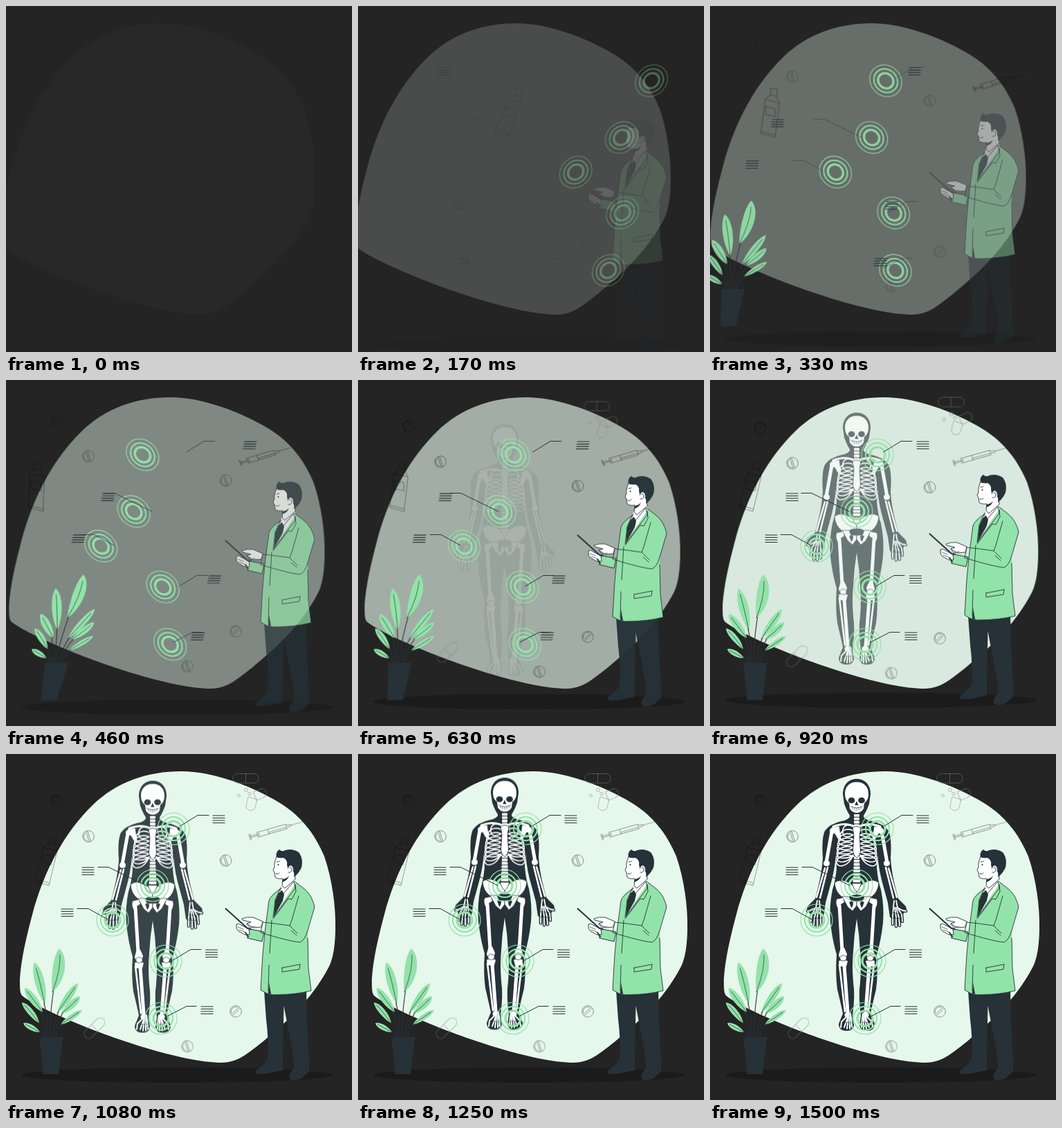
Animation of 500x500 px, one loop 1540 ms. Source, as an HTML page:

```html
<!DOCTYPE html>
<html lang="en">
<head>
<meta charset="utf-8">
<title>Anatomy lesson</title>
<style>
  html, body { margin: 0; width: 100%; height: 100%; overflow: hidden; background: #242424; }
  svg { display: block; width: 100vw; height: 100vh; }
  .line { fill: none; stroke: #263238; stroke-linecap: round; stroke-linejoin: round; }
  .ghost { fill: none; stroke: #000; stroke-opacity: .4; stroke-width: .9; }
  .caps { fill: none; stroke: #7d8480; stroke-opacity: .5; }
  .dark { fill: #263238; }
  .green { fill: #92e3a9; }
  .bone { fill: #fff; }
  .edged { fill: #fff; stroke: #263238; stroke-width: .8; stroke-linejoin: round; }
  .bones { fill: none; stroke: #fff; stroke-linecap: round; stroke-linejoin: round; }
</style>
</head>
<body>
<svg viewBox="0 0 500 500">
  <path id="blob" fill="#e6f7ec" d="M20 325C22 295 30 262 38 232C56 165 86 112 125 74C160 40 205 25 253 25C300 25 352 46 386 65C426 87 446 115 460 148C471 180 477 220 476 255C475 290 470 303 462 316C440 354 412 382 372 415C350 432 335 446 312 446C255 446 150 410 90 384C60 371 32 357 23 349C20 345 20 338 20 325Z"/>
  <ellipse id="shadow" cx="247" cy="464" rx="225" ry="11" fill="#1b1b1b"/>
  <g id="pills" class="ghost"></g>
  <g id="capsules" class="caps">
    <rect x="328" y="28.500" width="37" height="13.500" rx="6.700"/>
    <path d="M346.500 28.500V42"/>
    <g transform="translate(358 62) rotate(-24)">
      <path d="M2-6.500H13A6.500 6.500 0 0 1 13 6.500H2Z"/>
    </g>
    <path d="M350 62L363 66L360 77A6.700 6.700 0 0 1 347 74Z"/>
    <circle cx="336.500" cy="60" r="2"/><circle cx="347" cy="52" r="2.500"/><circle cx="352" cy="57.500" r="2.200"/>
    <g transform="translate(128 396) rotate(-45)">
      <rect x="-18.500" y="-6.700" width="37" height="13.400" rx="6.700"/><path d="M0-6.700V6.700"/>
    </g>
  </g>
  <g id="tube" class="ghost">
    <path d="M64.500 118.500L73 120.500L71 130.500L62 128.500ZM62 128.500L54 135L74 140L71 130.500M54 135L42 184L62 190L74 140M42.500 181L63 186.500M54 145L67 148.500L65.500 160L52 157Z"/>
  </g>
  <g id="syringe" class="ghost">
    <g transform="translate(352 120) rotate(-16)">
      <path d="M0-4.500V4.500M1.500-4.500V4.500M1.500-1H12M1.500 1H12M12-5V5M14-3.500H55V3.500H14ZM55-2L62-1V1L55 2M62 0H80"/>
      <path d="M28-3.500V3.500M28 1H54"/>
    </g>
  </g>
  <g id="body">
    <path class="dark" d="M212 36C225 36 232 46 232 58L230 72Q225 86 219 93H205Q199 86 194 72L192 58C192 46 199 36 212 36Z"/>
    <g id="half"></g>
    <use href="#half" transform="translate(424) scale(-1 1)"/>
    <path class="bone" d="M212 40.500C223 40.500 229 48 229 57C229 64 227 68 223 71L222 79Q218 85 212 85Q206 85 202 79L201 71C197 68 195 64 195 57C195 48 201 40.500 212 40.500Z"/>
    <g class="dark">
      <ellipse cx="204.500" cy="67" rx="4.900" ry="4.300"/><ellipse cx="219" cy="67" rx="4.900" ry="4.300"/>
      <path d="M211.800 68L214.500 74H209.200Z"/>
    </g>
    <path class="line" stroke-width=".6" d="M203 75.500Q212 80.500 221 75.500M206 76V79.500M209 77V81M212 78V81.500M215 77V81M218 76V79.500"/>
    <g id="spine" class="bone"></g>
    <path class="edged" d="M206 106Q212 103 218 106L216 118L217.500 140Q216 148 212 150Q208 148 206.500 140L208 118Z"/>
    <path class="edged" d="M205 187H219L215 196L212 199L209 196Z"/>
  </g>
  <g id="rings" fill="none" stroke="#92e3a9"></g>
  <path id="leads" class="line" stroke-width="1" stroke-linecap="butt" d="M252 104L277 88.500H293M133 163.500H148L202 190M103 223.500H119L147 239M241 298L267 282.500H282M233 379L261 364.500H275"/>
  <path id="notes" class="line" stroke-width="1.200"/>
  <g id="plant">
    <path class="line" stroke-width="1.100" d="M64 411Q62 385 69 340M61 411Q60 380 54 355M59 411Q56 388 49 368M57 411Q53 393 44 384M56 411Q53 401 45 398M67 411Q67 390 77 370M70 411Q70 392 83 373M72 411Q72 398 84 388"/>
    <g id="leaves" class="green"></g>
    <path class="dark" d="M48.500 409H82L76 462.500H54Z"/>
  </g>
  <g id="man">
    <path class="dark" d="M373 342L376 384Q380 415 378 440Q376 447 364 455Q359 459 362 462Q375 463 386 460L400 457L400 442L401.500 364L416 440L416 454Q406 465 411 470Q419 473 428 468Q433 463 438 459L438 447Q437 420 435 384L434 340Z"/>
    <path class="green" d="M352 253L373 257L370 271L349 266Z"/>
    <path class="line" d="M352 253L373 257L370 271L349 266Z"/>
    <path class="green" d="M398 194Q383 203 380 212L375 250Q371 285 370 306L368 341Q376 347 386 348Q418 348 441 342L437 310L436 255L446 221Q442 203 430 194L417 184Z"/>
    <path fill="#fff" d="M396 195L403 180L418 177L418 188L398 217L388 233Z"/>
    <path class="dark" d="M394 201L399 197L402 203L400 212L387 235L389 212Z"/>
    <path class="line" stroke-width=".9" d="M397 193L389 211L386 236L395 224L418 194L416 184L400 203L396 196M418 188L419 199L413 210L408 209L386 238"/>
    <path class="line" stroke-width=".9" d="M398 194Q383 203 380 212L375 250Q371 285 370 306L368 341Q376 347 386 348Q418 348 441 342L437 310L436 266M417 184L430 194Q442 203 446 221L436 255Q432 269 425 272Q410 271 368 258L371 243Q390 245 410 248L413 240L423 205M410 248L421 259M412 255L420 262M384 240L381 288M380 305L379 342M399 309L425 304M399 309L399 315L424 311L425 304"/>
    <path class="dark" d="M380 330L383 347L379 346Z"/>
    <path fill="#fff" stroke="#263238" stroke-width=".9" stroke-linejoin="round" d="M333 246Q336 244 341 248L351 253L352 261L345 261L336 256L333 252ZM341 238Q348 235 357 236L371 242L369 250L357 251L348 245L354 243L342 240Z"/>
    <path class="line" stroke-width=".7" d="M335 250L343 253M337 254L345 257M348 245L352 251L360 249"/>
    <path class="line" stroke-width="2" d="M317.500 223.500L349 252L354 253M346 258L350 264"/>
    <path fill="#fff" stroke="#263238" stroke-width=".9" d="M391 148Q387 158 388 163L386 168L388 171L389 178Q392 181 400 180L399 190L403 194L418 181L417 158L406 146Z"/>
    <path class="dark" d="M391 149Q389 142 395 138Q398 141 401 140Q412 135 423 142Q430 151 427 164Q423 173 416 178Q417 171 415 170Q416 162 411 161Q407 163 408 168L406 160Q407 153 401 150Q395 151 391 149ZM400 181Q406 180 409 176Q406 184 399 185Z"/>
    <circle class="dark" cx="393.500" cy="160" r="1.100"/>
    <path class="line" stroke-width=".9" d="M391 156L395 155M390 173Q393 175 395 172M410 164Q414 163 413 168Q412 172 408 171"/>
  </g>
</svg>
<script>
const LOOP = 1540, LEAD = 20;
const BACK = 'cubic-bezier(.36,-.01,.5,1.38)';
const $ = id => document.getElementById(id);
const range = n => [...Array(n).keys()];
const path = (d, attrs) => `<path d="${d}" ${attrs}/>`;

// Repeated drawings
$('pills').innerHTML = [[72.5, 67.5, 45], [119, 119, -18], [317.5, 154, -18], [332, 372, 45], [262, 422.5, -18]]
  .map(([x, y, turn]) => `<g transform="translate(${x} ${y}) rotate(${turn})">
    <circle r="8.300"/><path d="M-1.200-8V8M1.200-8V8M-3-6A6.700 6.700 0 0 0-3 6"/></g>`).join('');

$('rings').innerHTML = [[242, 108], [212, 190], [154, 240], [231, 299], [224, 382]]
  .map(([x, y]) => [[23, 1.1], [17, 2], [11, 3.2]]
    .map(([r, w]) => `<circle cx="${x}" cy="${y}" r="${r}" stroke-width="${w}"/>`).join('')).join('');

$('notes').setAttribute('d', [[299, 89], [110, 164], [80, 224], [288.5, 283], [282, 365]]
  .map(([x, y]) => range(4).map(i => `M${x} ${y + i * 3.5}h17`).join('')).join(''));

// A leaf from base to tip, bowed sideways, with its midrib
function leaf([bx, by, tx, ty, w, bow]) {
  const dx = tx - bx, dy = ty - by, len = Math.hypot(dx, dy);
  const nx = -dy / len * w, ny = dx / len * w;
  const at = (k, s) => `${(bx + dx * k + nx * s).toFixed(1)} ${(by + dy * k + ny * s).toFixed(1)}`;
  return path(`M${bx} ${by}C${at(.25, 1 + bow)} ${at(.8, 1.3 + bow)} ${tx} ${ty}` +
      `C${at(.8, bow - 1.3)} ${at(.25, bow - 1)} ${bx} ${by}Z`, '') +
    path(`M${bx} ${by}Q${at(.5, bow * 1.4)} ${at(.85, bow * .5)}`, 'class="line" stroke-width=".7"');
}
$('leaves').innerHTML = [[67, 344, 77, 281, 10, .5], [56, 361, 41, 301, 8, .1], [53, 373, 27, 338, 6.5, 0],
  [48, 389, 23, 359, 5, .2], [49, 402, 25, 389, 4.5, 0], [74, 374, 104, 331, 6, 0], [80, 375, 107, 350, 6, .2],
  [79, 391, 110, 370, 4.5, 0]].map(leaf).join('');

// Left side of the figure; the right side mirrors it
const ribs = range(8).map(i => {
  const x = 183 + 9 * .55 ** i, y = 105 + i * 6.2;
  return `M208 ${y}C196 ${y - 6} ${x - 1} ${y + 1} ${x} ${y + 9}C${x + 1} ${y + 16} 199 ${y + 16} 207 ${Math.min(y + 12, 146)}`;
}).join('');
const fingers = 'M153 222L146 226L141 227M153 222L147 232L146 242M155 222L151 236L150 248M157 222L155 236L155 249M159 222L160 234L160 246';
const strokes = [
  [1.7, ribs],
  [3, 'M209 105Q195 98 178 105'],
  [5, 'M176 112L168 157M187 219L191 284'],
  [8, 'M177 111H179M168 158H169'],
  [2.6, 'M166 165L154 207M170 164L159 208M187 304L195 372'],
  [5, 'M194 306L199 373'],
  [1.8, 'M155 212L153 222M158 212L159 222' + fingers],
  [7, 'M198 377H201'],
  [2, 'M197 380L190 387L189 395M199 381L194 395M200 381L198 397M202 381L202 397M204 380L205 395']
];
$('half').innerHTML =
  path('M212 80H202V91Q198 96 190 97Q173 101 166 111Q161 122 163 150Q162 170 156 193L152 209L142 219Q138 224 142 226L145 232Q154 240 164 236L167 215L173 193Q180 170 182 145L183 165Q181 185 177 196Q172 220 174 244Q177 270 183 290Q181 318 184 340Q190 365 192 375L186 390Q186 400 197 400Q206 401 208 392L206 378Q210 350 207 330Q205 305 207 286Q208 262 212 238Z', 'class="dark"') +
  path(fingers, 'class="line" stroke-width="4.600"') +
  path('M175 106L187 104L190 126L184 122Z', 'class="edged"') +
  path('M180 186Q188 179 201 186L212 194V204Q204 203 200 208Q196 213 190 206Q181 199 180 186Z', 'class="edged"') +
  path('M191 206L201 206L204 213L212 213V219L206 227L199 221Z', 'class="edged"') +
  path('M201 214Q207 212 207 216Q206 222 204 222Z', 'class="dark"') +
  strokes.map(([w, d]) => path(d, `class="bones" stroke-width="${w}"`)).join('') +
  path('M183 210L192 208L194 214L188 218L186 224Q181 218 183 210Z', 'class="bone"') +
  path('M189 280H194L198 289Q197 296 192 295Q186 296 186 290Z', 'class="bone"') +
  path('M186 299Q192 297 199 299L197 307H187Z', 'class="bone"') +
  path('M148 231L162 229M147 238L162 237M193 388H204', 'class="line" stroke-width=".7"') +
  '<ellipse class="edged" cx="192.500" cy="295" rx="4.800" ry="4"/>';

const vertebra = (y, w) => `<rect x="${212 - w / 2}" y="${y}" width="${w}" height="3.800" rx="1"/>`;
$('spine').innerHTML = range(4).map(i => vertebra(87 + i * 4.8, 8)).join('') +
  range(8).map(i => vertebra(148 + i * 4.8, 8 + i * .4)).join('');

// Entrances
const shows = [];
function enter(id, frames, { delay = 0, easing = BACK, origin = '0 0' } = {}) {
  const el = $(id);
  el.style.transformOrigin = origin;
  const show = el.animate(frames.map(f => ({ easing, ...f })), { duration: 1000, delay, fill: 'both' });
  show.pause();
  shows.push(show);
}
function slide(id, x, y, options) {
  enter(id, [{ opacity: 0, transform: `translate(${x}px,${y}px)` },
    { opacity: 1, transform: 'translate(0px,0px)' }], options);
}
// Rushes in sideways (side 1 = from the right), leaning around height y
function rush(id, side, y) {
  const pose = (x, lean) => `translateX(${x * side}px) skewX(${lean * side}deg)`;
  enter(id, [
    { offset: 0, opacity: 0, transform: pose(250, -20) },
    { offset: .6, opacity: 1, transform: pose(0, 10) },
    { offset: .8, opacity: 1, transform: pose(0, -2) },
    { offset: 1, opacity: 1, transform: pose(0, 0) }
  ], { origin: `0px ${y}px` });
}

slide('blob', -30, 0, { easing: 'linear' });
slide('shadow', 0, 30);
slide('man', 0, 30);
slide('pills', 0, -30);
slide('leads', 30, 0);
slide('body', 0, 30, { delay: 500 });
enter('capsules', [{ opacity: 0, transform: 'scale(.5)' }, { opacity: 1, transform: 'scale(1)' }],
  { origin: '246px 220px' });
rush('rings', 1, 245);
rush('tube', 1, 154);
rush('syringe', 1, 110);
rush('notes', -1, 232);
rush('plant', -1, 372);

const start = performance.now();
function tick() {
  const t = (performance.now() - start) % LOOP + LEAD;
  for (const show of shows) show.currentTime = t;
  requestAnimationFrame(tick);
}
tick();
</script>
</body>
</html>
```
